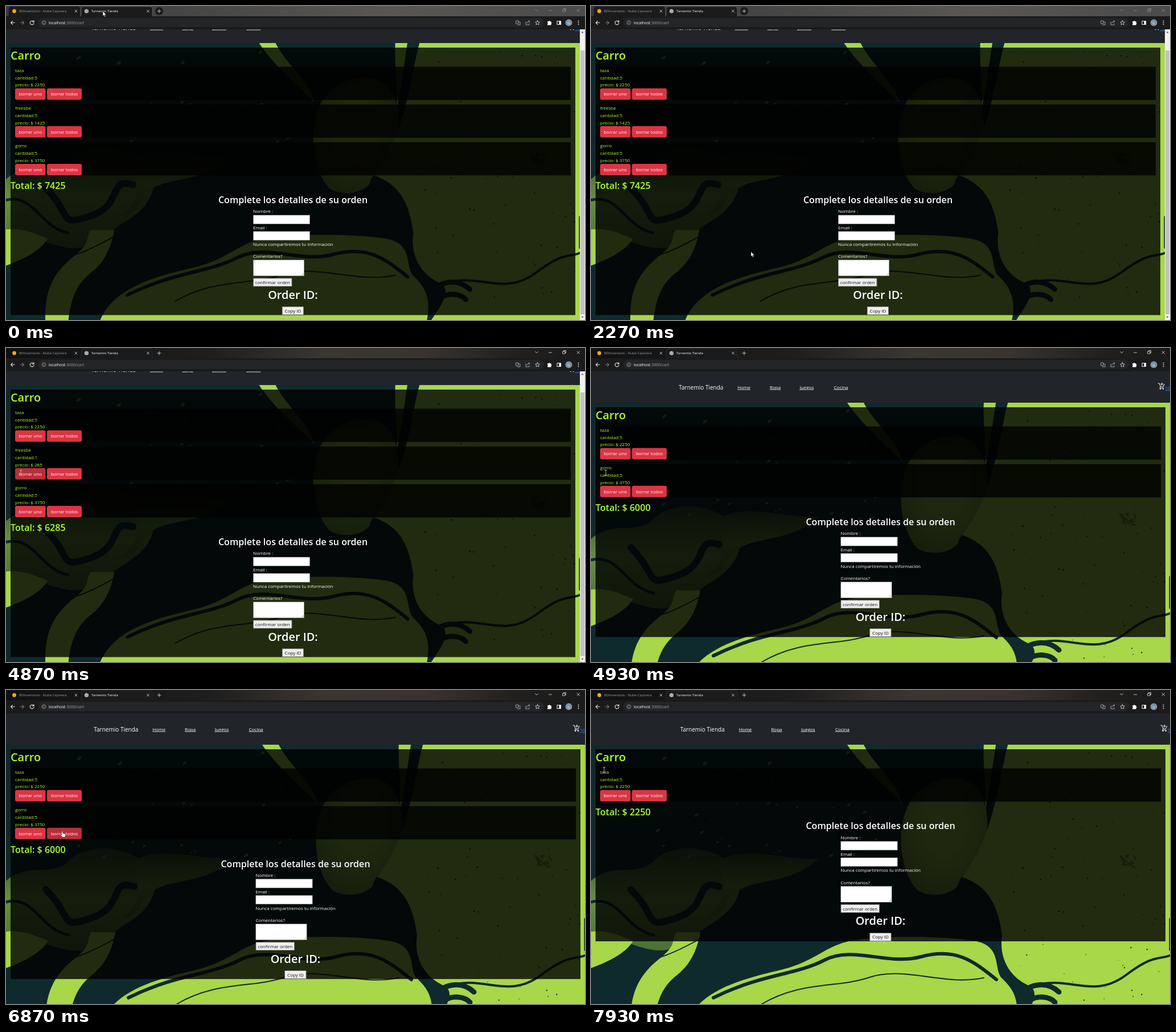
An HTML page that plays this animation: 1017 px wide and 551 px high, repeating every 8 s.

```html
<!DOCTYPE html>
<html lang="es">
<head>
<meta charset="utf-8">
<title>Carro</title>
<style>
  html, body { margin: 0; width: 100%; height: 100%; overflow: hidden; background: #0f2a2c; }
  svg { display: block; width: 100vw; height: 100vh; }
  text { font: 400 8px "Open Sans", "Noto Sans", sans-serif; fill: #fff; white-space: pre; }
  .h1 { font-size: 19.9px; font-weight: 600; }
  .h2 { font-size: 16.1px; font-weight: 600; }
  .lime { fill: #adff2f; }
  .mid { text-anchor: middle; }
  .brand { font-size: 10px; }
  .link { text-decoration: underline; }
  .count { fill: #2b7bff; text-decoration: underline; }
  .dark { fill: #111; }
  .tab { font-size: 6px; }
  .url { font-size: 7px; }
  .dim { fill: #9aa0a6; }
  .line { fill: none; stroke: #e4e6e8; stroke-width: 1.1; stroke-linecap: round; stroke-linejoin: round; }
  .thin { stroke-width: .8; }
  .field { fill: #fff; stroke: #767676; stroke-width: .6; }
  .plain { fill: #efefef; stroke: #767676; stroke-width: .8; }
</style>
</head>
<body>
<svg viewBox="0 0 1017 551" preserveAspectRatio="none">
  <defs>
    <linearGradient id="active">
      <stop offset="0" stop-color="#111112"/><stop offset=".35" stop-color="#1f1e1d"/>
      <stop offset=".55" stop-color="#3a3632"/><stop offset=".72" stop-color="#393430"/>
      <stop offset=".88" stop-color="#22201e"/><stop offset="1" stop-color="#1a1a1a"/>
    </linearGradient>
    <linearGradient id="idle">
      <stop offset="0" stop-color="#39393a"/><stop offset=".35" stop-color="#484847"/>
      <stop offset=".66" stop-color="#5a5754"/><stop offset="1" stop-color="#4b4b4b"/>
    </linearGradient>
    <radialGradient id="head" cx=".5" cy=".4" r=".62">
      <stop offset=".4" stop-color="#9cc845"/><stop offset="1" stop-color="#6f9a3a"/>
    </radialGradient>
    <linearGradient id="flow" x2="0" y2="1">
      <stop offset="0" stop-color="#33542f"/><stop offset=".5" stop-color="#65903b"/><stop offset="1" stop-color="#4a7034"/>
    </linearGradient>
  </defs>

  <g id="paint">
    <rect y="30" width="1030" height="570" fill="#0f2a2c"/>
    <path fill="url(#flow)" d="M0 335C40 300 80 330 110 300S200 270 240 300S262 380 215 408S150 470 90 452S30 420 0 425Z"/>
    <path fill="url(#flow)" d="M225 300C270 270 340 300 400 296C350 340 300 330 262 350S250 390 205 400C250 360 225 330 225 300Z"/>
    <path fill="url(#head)" d="M556 205C575 160 640 140 675 168C704 205 700 255 682 300C665 318 648 324 644 344C625 364 590 362 574 352C542 318 536 250 556 205Z"/>
    <g fill="#a8d74a">
      <path d="M734 90C716 150 712 250 652 328C700 345 715 380 722 430C716 470 735 505 772 520C790 535 770 560 750 590H1030V90Z"/>
      <path d="M690 90H712C706 130 700 175 692 215C694 170 688 130 690 90Z"/>
      <path d="M165 590C185 530 260 508 330 492S410 445 470 438S620 432 672 440S706 490 722 506S756 540 745 590Z"/>
      <path d="M70 590C66 524 92 494 122 470S140 440 150 425H192C186 460 172 482 156 496S116 524 110 590Z"/>
      <path d="M0 424C30 420 52 432 74 440C62 462 28 478 0 488Z"/>
      <path d="M446 90C470 128 512 165 546 198C538 160 494 130 476 90Z"/>
    </g>
    <g fill="none" stroke="#0f2a2c" stroke-linecap="round">
      <path stroke-width="4" d="M775 520C840 498 880 545 940 500S1000 480 1030 458"/>
      <path stroke-width="9" d="M757 530C780 512 805 514 822 530M770 545C785 535 806 538 815 548"/>
      <path stroke-width="6" d="M215 540C300 498 360 500 410 474S520 484 580 468S670 474 712 508"/>
      <path stroke-width="2" d="M300 551C370 510 430 524 490 504S620 520 690 505M80 474C110 478 150 460 196 434"/>
      <path stroke-width="12" d="M70 350C120 400 90 420 150 400S180 330 225 345"/>
      <path stroke-width="5" d="M0 372C50 360 60 420 110 430M1018 402V456"/>
    </g>
    <g id="specks"></g>
  </g>

  <g id="page"></g>
  <g id="chrome"></g>
  <g id="cursor"></g>
</svg>
<script>
const LOOP = 8000, STEP = 200 / 3;
const SHOP = "Tarnemio Tienda";
const layer = id => document.getElementById(id);
const text = (x, y, s, cls = "") => `<text x="${x}" y="${y}" class="${cls}">${s}</text>`;
const rect = (x, y, w, h, attrs = "") => `<rect x="${x}" y="${y}" width="${w}" height="${h}" ${attrs}/>`;
const dot = (x, y, r, fill) => `<circle cx="${x}" cy="${y}" r="${r}" fill="${fill}"/>`;
const line = (d, cls = "", stroke = "") => `<path class="line ${cls}" d="${d}" style="stroke:${stroke}"/>`;

// Bubbles on the dark side, droplets on the light side
let seed = 11;
const rnd = (a, b) => a + (b - a) * ((seed = seed * 16807 % 2147483647) / 2147483647);
let specks = "";
for (let i = 0; i < 130; i++) {
  const light = i < 40;
  const x = light ? rnd(110, 500) : rnd(735, 1010);
  const y = light ? rnd(110, 300) : rnd(110, 545);
  const r = light ? rnd(.8, 2.6) : rnd(.4, 1.4);
  specks += `<ellipse rx="${r * (light ? 2 : 1)}" ry="${r}" fill="${light ? "#5f8a3a" : "#123030"}"
    transform="translate(${x} ${y}) rotate(-35)"/>`;
}
for (let i = 0; i < 14; i++) {
  specks += `<ellipse rx="${rnd(2, 9)}" ry="1.4" fill="#6a9038" transform="translate(${rnd(932, 958)} ${rnd(284, 312)}) rotate(${rnd(0, 180)})"/>`;
}
layer("specks").innerHTML = specks;

// When one "freesbe" is taken out, and when "gorro" goes
const removals = [3240, 3560, 4000, 4430, 4900];
const GORRO_OUT = 6900, FOCUS = 2720;

function cartAt(t) {
  const freesbe = 5 - removals.filter(at => t >= at).length;
  return [["taza", 5, 450], ["freesbe", freesbe, 285], ["gorro", t < GORRO_OUT ? 5 : 0, 750]]
    .filter(item => item[1]);
}

const buttons = [["borrar uno", 16, 53.5], ["borrar todos", 72, 61]];

function layout(cart) {
  const scrolled = cart.length > 2;
  const top = scrolled ? 73 : 104;
  return { scrolled, top, width: scrolled ? 1008 : 1017, end: top + 33.6 + 66.2 * cart.length };
}

function hoverAt(cart, x, y) {
  const { top } = layout(cart);
  for (let i = 0; i < cart.length; i++) {
    const by = top + 71.6 + 66.2 * i;
    const hit = buttons.findIndex(b => x >= b[1] && x <= b[1] + b[2] && y >= by && y <= by + 20);
    if (hit >= 0) return i + ":" + hit;
  }
  return "";
}

function drawNav(cart, scrolled) {
  const count = cart.reduce((n, item) => n + item[1], 0);
  const dy = scrolled ? -31 : 0;
  const dx = scrolled ? -4.3 : count < 10 ? 2.4 : 0;
  const cx = scrolled ? -8.5 : count < 10 ? 4.6 : 0;
  const links = [["Home", 257.3], ["Ropa", 314], ["Juegos", 366.7], ["Cocina", 426.5]];
  return rect(0, 41 + dy, 1017, 55, 'fill="#212529"')
    + text(154.3 + dx, 72.5 + dy, SHOP, "brand")
    + links.map(([s, x]) => text(x + dx, 71.6 + dy, s, "link")).join("")
    + `<g transform="translate(${cx} ${dy})">`
    + line("M996 62H998L1000.5 68H1005L1007 63.5M1000.5 68L999 70.3H1006M1002.7 61V65.5M1000.5 63.3H1005")
    + dot(1000, 72, 1.1, "#fff") + dot(1005, 72, 1.1, "#fff")
    + text(1008, 73, count, "count") + "</g>";
}

function drawCard([name, qty, price], i, top, width, hover) {
  const y = top + 33.6 + 66.2 * i;
  return rect(16, y, width - 32, 58.3, 'fill="rgba(0,0,0,.8)"')
    + text(16, y + 9.3, name, "lime")
    + text(16, y + 22, "cantidad:" + qty, "lime")
    + text(16, y + 34.7, "precio: $ " + qty * price, "lime")
    + buttons.map(([label, x, w], k) =>
        rect(x, y + 38, w, 20, `rx="3" fill="${hover === i + ":" + k ? "#bb2d3b" : "#dc3545"}"`)
        + text(x + w / 2, y + 50.8, label, "mid")).join("");
}

function drawForm(y, c) {
  const x = c - 70;
  return text(c, y + 40.5, "Complete los detalles de su orden", "h2 mid")
    + text(x, y + 58.2, "Nombre :")
    + rect(x + .3, y + 61.8, 99.4, 15.4, 'class="field"')
    + text(x, y + 86.8, "Email :")
    + rect(x + .3, y + 90.4, 99.4, 15.4, 'class="field"')
    + text(x, y + 115.6, "Nunca compartiremos tu información")
    + text(x, y + 136.7, "Comentarios?")
    + rect(x + .3, y + 140.5, 89.4, 28, 'class="field"')
    + `<path d="M${x + 85} ${y + 167.5}l4 -4m-2 4l2 -2" stroke="#777" stroke-width=".6"/>`
    + rect(x + .5, y + 172.7, 67.5, 14, 'class="plain"')
    + text(x + 34.2, y + 182.7, "confirmar orden", "mid dark")
    + text(c, y + 208.6, "Order ID:", "h1 mid")
    + rect(c - 18.8, y + 222.6, 37.4, 14, 'class="plain"')
    + text(c, y + 232.6, "Copy ID", "mid dark");
}

function drawPage(cart, hover) {
  const { scrolled, top, width, end } = layout(cart);
  const total = cart.reduce((sum, item) => sum + item[1] * item[2], 0);
  let out = drawNav(cart, scrolled)
    + rect(8, top, width - 16, end + 237.2 - top, 'fill="rgba(0,0,0,.8)"')
    + text(8, top + 21, "Carro", "h1 lime")
    + cart.map((item, i) => drawCard(item, i, top, width, hover)).join("")
    + text(8, end + 16, "Total: $ " + total, "h2 lime")
    + drawForm(end, width / 2);
  if (scrolled) {
    out += rect(1008, 41, 9, 510, 'fill="#f1f1f1"') + rect(1009, 78, 7, 463, 'fill="#c1c1c1"')
      + '<path d="M1010.5 47.2L1012.5 44.4L1014.5 47.2ZM1010.5 544.8L1012.5 547.6L1014.5 544.8Z" fill="#505050"/>';
  }
  layer("page").innerHTML = out;
  layer("paint").setAttribute("transform", scrolled ? "translate(0 -28) scale(.991)" : "");
}

function drawChrome(focused) {
  const bar = "#1b1b1c";
  const tab = (x, w, stroke) => `<path d="M${x - 3} 18.5Q${x} 18.5 ${x} 15V5Q${x} 1 ${x + 4} 1H${x + w - 4}Q${x + w} 1 ${x + w} 5V15Q${x + w} 18.5 ${x + w + 3} 18.5Z" fill="${bar}" stroke="${stroke}" stroke-width=".6"/>`;
  layer("chrome").innerHTML = rect(0, 0, 1017, 19, `fill="url(#${focused ? "active" : "idle"})"`)
    + (focused ? "" : tab(5, 125, "none") + dot(269, 9, 7, bar))
    + tab(132, 125, focused ? "#333" : "#777")
    + rect(0, 18, 1017, 23, `fill="${bar}"`)
    + rect(57, 21, 888, 16, 'rx="8" fill="#242526"')
    + dot(14.5, 9, 3.4, "#f6a623")
    + text(23, 11.2, "BDInventario - Nube Cajonera", "tab dim")
    + text(150, 11.2, SHOP, "tab")
    + line("M121 7L125 11M125 7L121 11M247.5 7L251.5 11M251.5 7L247.5 11M269 6V12M266 9H272", "thin")
    + dot(141.5, 9, 3.6, "#c8cacc")
    + line("M139 7.5L141 8.5L140.5 11M142 6L144 8L143 11", "thin", "#555")
    + `<g opacity="${focused ? 1 : .4}">`
    + line("M929.5 6.3L932 8.8L934.5 6.3M953.5 8H958.5M978 6H982V10H978ZM979.5 6V4.5H983.5V8.5H982M1003 5.5L1007.5 10M1007.5 5.5L1003 10", "thin") + "</g>"
    + line("M15 29.3H8.5M11.5 26.3L8.5 29.3L11.5 32.3M48.3 27.3A3.4 3.4 0 1 0 49 30M49 25.5V28H46.5")
    + line("M25 29.3H31.5M28.5 26.3L31.5 29.3L28.5 32.3", "", "#777")
    + line("M66.5 29V31M66.5 27.2V27.3M63.2 29.2A3.3 3.3 0 1 0 69.8 29.2A3.3 3.3 0 1 0 63.2 29.2", "thin", "#aaa")
    + text(75, 31.8, 'localhost<tspan class="dim">:3000/cart</tspan>', "url")
    + line("M896 26H900V31H896ZM900 28H903V33H898.5M913 28V33H919V31M915 30Q915 27 919.5 27M918 25.5L920 27L918 28.7", "thin", "#bbb")
    + line("M933.5 25.5L934.6 28L937.3 28.3L935.3 30.2L935.9 32.9L933.5 31.5L931.1 32.9L931.7 30.2L929.7 28.3L932.4 28Z", "thin")
    + '<path d="M951 27H953A1.3 1.3 0 0 1 955.5 27H957.5V29A1.3 1.3 0 0 1 957.5 31.5V33.5H951V31.5A1.3 1.3 0 0 0 951 29Z" fill="#fff"/>'
    + line("M968 26.5H974.5V32.5H968Z") + rect(971.5, 26.5, 3, 6, 'fill="#fff"')
    + dot(988.5, 29.3, 6, "#7d93a3") + text(988.5, 31.5, "G", "tab mid")
    + [26.3, 29.3, 32.3].map(y => dot(1005.5, y, .9, "#fff")).join("");
}

const shapes = {
  arrow: '<path d="M0 0V8.6L2 6.8L3.4 10L4.8 9.4L3.4 6.4H6Z" fill="#fff" stroke="#111" stroke-width=".5"/>',
  hand: '<path d="M-1 1Q0 -.6 1 1V4.5L5 5.6Q6 6 5.7 7.4L4.8 11.3H-.2L-3 7.3Q-3 6 -1 7Z" fill="#fff" stroke="#111" stroke-width=".6"/>',
  beam: '<path d="M-2 -4.5H2M0 -4.5V4.5M-2 4.5H2" fill="none" stroke="#bbb" stroke-width=".9"/>'
};

// time, x, y
const route = [
  [0, 170, 9], [200, 130, 110], [530, 251, 344], [670, 251, 344], [800, 256, 345], [1200, 7, 224],
  [1810, 7, 224], [2000, 70, 350], [2267, 281, 431], [2380, 341, 434], [2670, 342, 4], [2740, 342, 4],
  [3070, 27, 220], [4860, 26, 219], [5010, 26, 219], [5270, 9, 285], [5400, 17, 301], [5610, 17, 301],
  [5870, 50, 262], [6200, 100, 248], [6470, 100, 248], [6530, 99, 247], [6900, 99, 247], [7330, 24, 128],
  [7410, 24, 128], [7600, 24, 153], [7810, 24, 153], [7930, 23, 140], [8000, 23, 140]
];

function cursorAt(t) {
  const i = Math.max(1, route.findIndex(p => p[0] > t));
  const [t0, x0, y0] = route[i - 1], [t1, x1, y1] = route[i];
  const u = (t - t0) / (t1 - t0), e = u * u * (3 - 2 * u);
  return [x0 + (x1 - x0) * e, y0 + (y1 - y0) * e];
}

let pageKey, focusKey;
function render(now) {
  const t = Math.floor((now % LOOP + 4) / STEP) * STEP % LOOP;
  const cart = cartAt(t), [x, y] = cursorAt(t), hover = hoverAt(cart, x, y);
  const focused = t >= FOCUS, key = cart + "|" + hover;
  if (key !== pageKey) drawPage(cart, hover);
  if (focused !== focusKey) drawChrome(focused);
  pageKey = key;
  focusKey = focused;
  const overText = t > 4850 && t < 5100 || t > 7300;
  const cursor = layer("cursor");
  cursor.innerHTML = shapes[overText ? "beam" : hover ? "hand" : "arrow"];
  cursor.setAttribute("transform", `translate(${x} ${y})`);
}

const start = performance.now();
function tick() {
  render(performance.now() - start);
  requestAnimationFrame(tick);
}
tick();
</script>
</body>
</html>
```
